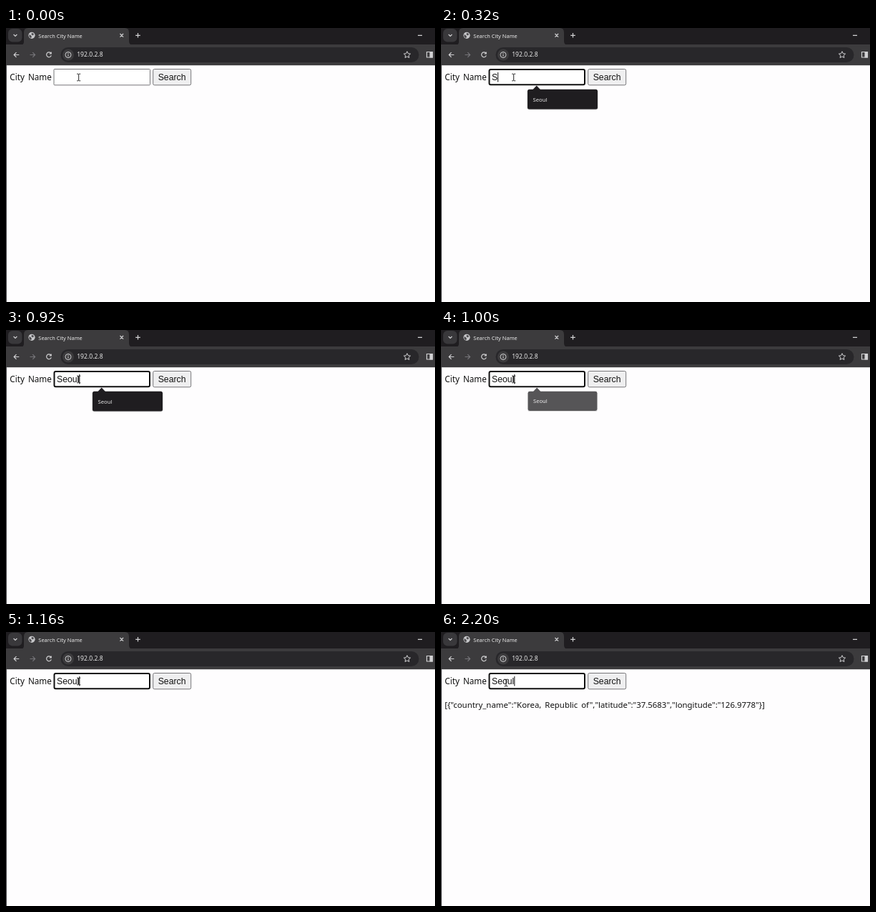
Animation, 600 px wide and 383 px high, one loop 2240 ms. Source, as an HTML page:

```html
<!DOCTYPE html>
<html lang="en">
<head>
<meta charset="utf-8">
<title>Search City Name</title>
<style>
  html, body { margin: 0; width: 100%; height: 100%; overflow: hidden; background: #fefdfe; }
  svg { display: block; width: 600px; height: 383px; }
  text { white-space: pre; }
  .ui { font: 7.7px "Noto Sans", "Open Sans", sans-serif; fill: #e8e8e8; }
  .page { font: 11.4px "Noto Sans", "Open Sans", sans-serif; word-spacing: 2px; fill: #111; }
  .form { font: 12.25px "Liberation Sans", Arial, sans-serif; fill: #111; }
  .icon { fill: none; stroke: #d2d2d4; stroke-width: 1.2; }
</style>
</head>
<body>
<svg viewBox="0 0 600 383">
  <rect width="600" height="383" fill="#fefdfe"/>

  <!-- tab strip -->
  <rect width="600" height="24" fill="#1f1d20"/>
  <rect x="3" y="1" width="19.5" height="18.5" rx="6" fill="#39383b"/>
  <path class="icon" d="M10.6 9l2.4 2.4L15.400 9"/>
  <path d="M20 24q5 0 5-5V6q0-6 6-6H166q6 0 6 6V18q0 6 6 6z" fill="#3c3b3d"/>
  <circle cx="36" cy="10.300" r="4.600" fill="#c6c6c9"/>
  <path d="M32.500 9l2.500 1.500 1 2-1.300 1.700-2.300-2zM36 6.700l3 1.300-1 2.500-2.500-1.300z" fill="#4b4a4d"/>
  <text class="ui" x="45.300" y="13.500" style="font-size:7.450px">Search City Name</text>
  <path class="icon" d="M159.500 8l4.600 4.600m0-4.600l-4.600 4.600M181.200 10.300h6.600m-3.300-3.300v6.600M576 10.300h6"/>

  <!-- toolbar -->
  <rect y="23" width="600" height="29.200" fill="#3c3b3d"/>
  <rect x="76.500" y="27" width="501" height="21" rx="10.500" fill="#28272a"/>
  <path class="icon" d="M18.300 37.500h-7m3.200-3.300l-3.300 3.300 3.300 3.300"/>
  <path class="icon" d="M33.500 37.500h7m-3.200-3.300l3.300 3.300-3.300 3.300" style="stroke:#77767a"/>
  <path class="icon" d="M62.700 35.200a3.400 3.400 0 1 0 .6 3.200M63.200 33.500v2.500h-2.600"/>
  <circle cx="87" cy="37.500" r="8" fill="#3c3b3d"/>
  <circle class="icon" cx="87" cy="37.500" r="4" style="stroke-width:1"/>
  <path class="icon" d="M87 36.800v2.700M87 35v1" style="stroke-width:1"/>
  <text class="ui" x="99.200" y="40.400" style="font-size:8.600px">192.0.2.8</text>
  <path class="icon" d="M561 32.700l1.400 3 3.200.4-2.400 2.200.7 3.200-2.900-1.600-2.900 1.600.7-3.200-2.400-2.200 3.200-.4z" style="stroke-width:1"/>
  <path class="icon" d="M588.500 33.500h8v7.500h-8z"/>
  <path d="M592.500 33h4.500v8.500h-4.500z" fill="#d2d2d4"/>
  <rect y="52" width="1" height="331" fill="#49484b"/>

  <!-- page -->
  <text class="page" x="5.300" y="72.800" style="font-size:11.700px">City Name</text>
  <rect id="field" fill="#fff"/>
  <text class="form" id="value" x="71" y="73"></text>
  <rect id="caret" y="62" width="1" height="13.500" fill="#111"/>
  <rect x="205.700" y="57.500" width="53" height="22.300" rx="2" fill="#efeff0" stroke="#777679"/>
  <text class="form" x="212.700" y="73">Search</text>
  <text class="page" id="result" x="5.200" y="105.700">[{"country_name":"Korea, Republic of","latitude":"37.5683","longitude":"126.9778"}]</text>

  <g id="popup">
    <rect id="shadow" x="120.500" y="86.500" width="99" rx="3" fill="#000" opacity=".22"/>
    <path d="M128 86.500l5.700-6 5.700 6z" fill="#1f1d20"/>
    <rect id="panel" x="121" y="85.700" width="98" rx="2.500" fill="#1f1d20"/>
    <g class="ui" id="items"></g>
  </g>

  <path id="pointer" fill="none" stroke="#222" d="M-2.500 -4.800h1.700l.8.600.8-.6h1.700M0 -4.200v8.400M-2.500 4.800h1.700l.8-.6.8.6h1.700"/>
</svg>
<script>
const LOOP = 2240, STEP = 40, FOCUS = 40, FILTER = 320, CLOSE = 960, RESULT = 1240;
const word = "Seoul", keyTimes = [280, 440, 560, 760, 880];
const caretStops = [0, .667, 1.223, 1.779, 2.335, 2.557];
const cities = ["Seoul", "tokyo", "Tokyo", "123"];

const $ = id => document.getElementById(id);
const set = (id, attrs) => {
  for (const name in attrs) $(id).setAttribute(name, attrs[name]);
};
const clamp = v => Math.max(0, Math.min(1, v));
const smooth = v => v * v * (3 - 2 * v);

$("items").innerHTML = cities
  .map((city, i) => `<text x="128.500" y="${102.7 + 22.7 * i}">${city}</text>`).join("");

function drawField(t) {
  const focused = t >= FOCUS;
  const typed = keyTimes.filter(k => k <= t).length;
  set("field", focused
    ? { x: 67.5, y: 58, width: 133.5, height: 21.3, rx: 2, stroke: "#101010", "stroke-width": 2 }
    : { x: 67, y: 57.5, width: 134.5, height: 22.3, rx: 1, stroke: "#777679", "stroke-width": 1 });
  $("value").textContent = word.slice(0, typed);

  // The blink restarts with every key press.
  const since = t - (typed ? keyTimes[typed - 1] : FOCUS);
  const lit = focused && Math.floor(since / 530) % 2 === 0;
  set("caret", { x: 71 + 12.25 * caretStops[typed], opacity: +lit });
}

function drawPopup(t) {
  const shown = t < CLOSE ? clamp((t - FOCUS) / 80) : 1 - clamp((t - CLOSE) / 160);
  const rows = t < FILTER ? cities.length : 1;
  const height = 5 + 22.7 * rows;
  const scale = .95 + .05 * shown;
  set("popup", {
    opacity: shown,
    transform: `translate(170 86) scale(${scale}) translate(-170 -86)`
  });
  set("panel", { height });
  set("shadow", { height });
  [...$("items").children].forEach((row, i) => row.setAttribute("opacity", +(i < rows)));
}

function draw() {
  const t = Math.floor(performance.now() % LOOP / STEP) * STEP;
  drawField(t);
  drawPopup(t);
  set("result", { opacity: +(t >= RESULT) });
  const move = smooth(clamp((t - 1840) / 360));
  set("pointer", { transform: `translate(${101.7 - 10.7 * move} ${69 + 2 * move})` });
  requestAnimationFrame(draw);
}
draw();
</script>
</body>
</html>
```
